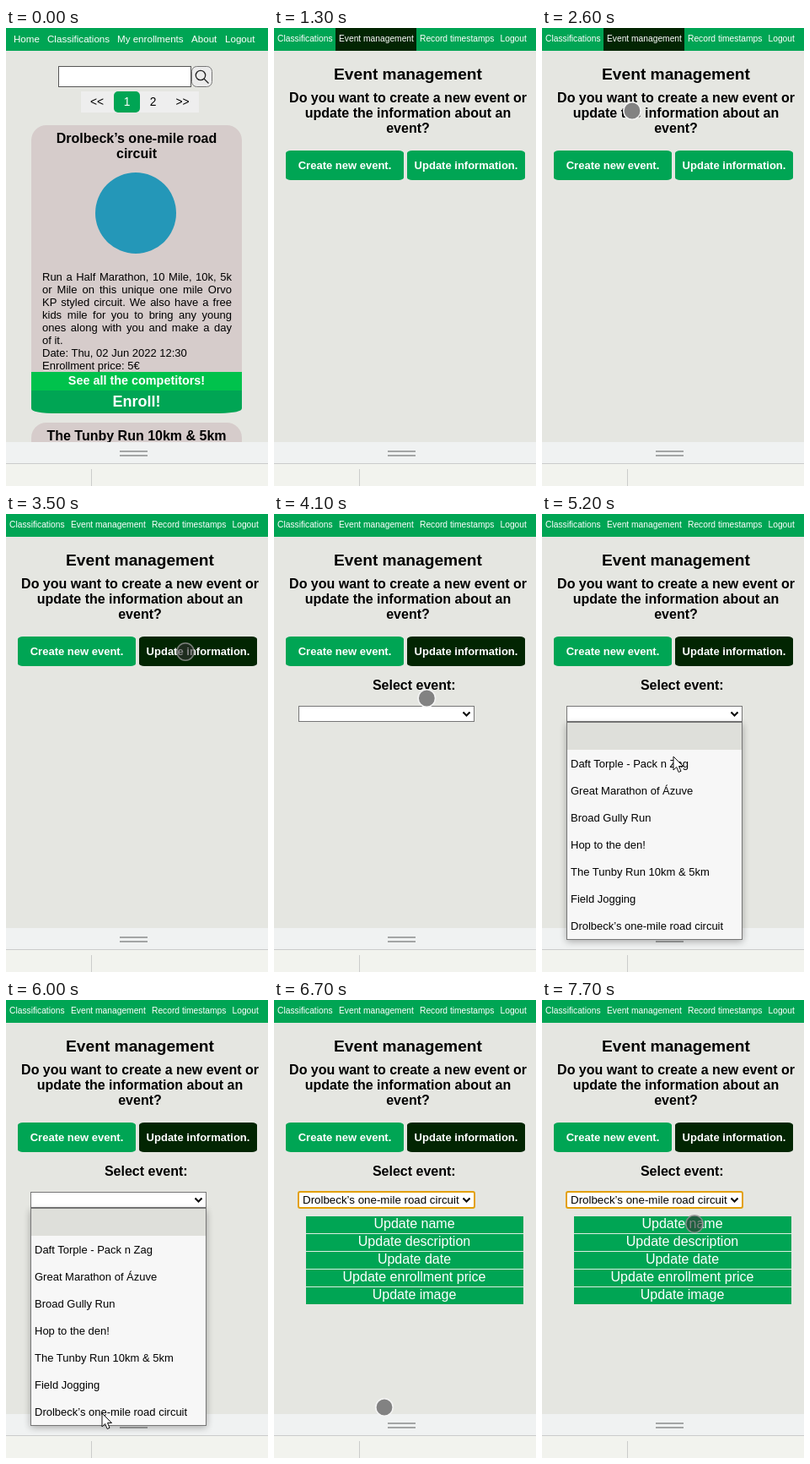
These frames come from a looping animation (311x542 px, 8000 ms). An HTML page:

```html
<!DOCTYPE html>
<html lang="en">
<head>
<meta charset="utf-8">
<title>Event management</title>
<style>
html, body { margin: 0; width: 100%; height: 100%; overflow: hidden; background: #e5e6e1; }
svg { position: absolute; left: 0; top: 0; display: block; }
svg, p { font-family: "Liberation Sans", Arial, sans-serif; }
text { white-space: pre; }
p { margin: 0; font-size: 13px; line-height: 15px; text-align: justify; color: #000; }
.b { font-weight: bold; }
.w { fill: #fff; }
.m { text-anchor: middle; }
.green { fill: #00a554; }
.dark { fill: #022502; }
</style>
</head>
<body>
<svg width="311" height="542" viewBox="0 0 311 542">
  <defs>
    <filter id="blur" x="-20%" y="-20%" width="140%" height="140%"><feGaussianBlur stdDeviation="4"/></filter>
  </defs>
  <rect width="311" height="542" fill="#e5e6e1"/>
  <rect class="green" width="311" height="27"/>

  <g id="home">
    <g id="homeNav" class="w" font-size="11.6"></g>
    <rect x="62.5" y="45.5" width="157" height="24" fill="#fff" stroke="#555"/>
    <rect x="220.5" y="45.5" width="24" height="24" rx="6" fill="#ebebeb" stroke="#777"/>
    <g fill="none" stroke="#222" stroke-width="1.3"><circle cx="231" cy="56" r="5.7"/><path d="M235 60L240.500 65.500"/></g>
    <rect x="89" y="75" width="140" height="25" fill="#eeeeee"/>
    <rect class="green" x="128" y="75" width="31" height="25" rx="5"/>
    <g id="pages" class="m" font-size="13.8"></g>
    <path d="M30 456V133a18 18 0 0 1 18-18H262a18 18 0 0 1 18 18V440H30Z" fill="#d6cccb"/>
    <g class="m b" font-size="16">
      <text x="155" y="136">Drolbeck’s one-mile road</text>
      <text x="155" y="154">circuit</text>
    </g>
    <circle cx="154" cy="219" r="48" fill="#2497b8"/>
    <foreignObject x="43" y="287" width="225" height="122">
      <p>Run a Half Marathon, 10 Mile, 10k, 5k or Mile on this unique one mile Orvo KP styled circuit. We also have a free kids mile for you to bring any young ones along with you and make a day of it.</p>
      <p>Date: Thu, 02 Jun 2022 12:30</p>
      <p>Enrollment price: 5€</p>
    </foreignObject>
    <rect x="30" y="429" width="250" height="28" fill="#e5e6e1"/>
    <rect x="30" y="407" width="250" height="22" fill="#00c24c"/>
    <path class="green" d="M30 429H280V450q0 6-32 6H62q-32 0-32-6Z"/>
    <g class="m b w">
      <text x="155" y="422" font-size="14.4">See all the competitors!</text>
      <text x="155" y="448" font-size="18">Enroll!</text>
    </g>
    <path d="M30 490V485a18 18 0 0 1 18-18H262a18 18 0 0 1 18 18V490Z" fill="#d6cccb"/>
    <text class="m b" x="155" y="488" font-size="16">The Tunby Run 10km &amp; 5km</text>
  </g>

  <g id="manage">
    <rect id="tab" class="dark" x="73" width="96" height="27"/>
    <g id="adminNav" class="w" font-size="10.25"></g>
    <g class="m b" font-size="16">
      <text x="159" y="61" font-size="19.2">Event management</text>
      <text x="159" y="88">Do you want to create a new event or</text>
      <text x="159" y="106">update the information about an</text>
      <text x="159" y="124">event?</text>
    </g>
    <rect class="green" x="14" y="145" width="140" height="35" rx="6" ry="3"/>
    <rect id="update" x="158" y="145" width="140" height="35" rx="6" ry="3"/>
    <g class="m b w" font-size="13">
      <text x="84" y="167">Create new event.</text>
      <text x="228" y="167">Update information.</text>
    </g>
    <g id="select">
      <text class="m b" x="166.300" y="208" font-size="16">Select event:</text>
      <rect x="29.500" y="227.500" width="208" height="18" fill="#fff" stroke="#767676"/>
      <path d="M224.500 234.500l4 4l4-4" fill="none" stroke="#000" stroke-width="2"/>
    </g>
    <g id="chosen">
      <rect x="29" y="227" width="209" height="19" rx="2" fill="none" stroke="#e3a008" stroke-width="2"/>
      <text x="34" y="241" font-size="13.333">Drolbeck’s one-mile road circuit</text>
      <rect x="38" y="256" width="258" height="104" fill="#dceee2"/>
      <g id="updates" class="m w" font-size="16"></g>
    </g>
  </g>

  <rect id="bar" y="490" width="311" height="25"/>
  <path d="M135 501H168M135 506H168" stroke="#a3a5a5" stroke-width="2"/>
  <rect y="515" width="311" height="27" fill="#f2f3ee"/>
  <path d="M0 515.500H311M101.500 522V542" stroke="#cbcccb"/>

  <g id="popup">
    <rect x="29" y="249" width="209" height="257" fill="#000" opacity=".3" filter="url(#blur)"/>
    <rect x="29.500" y="246.500" width="208" height="257" fill="#f7f7f7" stroke="#767676"/>
    <rect x="30" y="247" width="207" height="32" fill="#dedfda"/>
    <g id="options" font-size="13"></g>
  </g>

  <circle id="touch" r="10.200" stroke-width="1.600"/>
  <path id="arrow" d="M0 0V16L3.700 12.500L6.200 18.500L9 17.300L6.500 11.500H11.500Z" fill="#fff" stroke="#111"/>
</svg>
<script>
const $ = id => document.getElementById(id);
const fill = (id, items, make) => { $(id).innerHTML = items.map(make).join(""); };
const label = (x, y, s) => `<text x="${x}" y="${y}">${s}</text>`;

fill("homeNav", [["Home", 9], ["Classifications", 49], ["My enrollments", 132], ["About", 220], ["Logout", 260]],
  ([s, x]) => label(x, 17, s));
fill("adminNav", [["Classifications", 4], ["Event management", 77], ["Record timestamps", 173], ["Logout", 268.5]],
  ([s, x]) => label(x, 16, s));
fill("pages", [["&lt;&lt;", 108], ['<tspan fill="#fff">1</tspan>', 143.5], ["2", 174.5], ["&gt;&gt;", 209.5]],
  ([s, x]) => label(x, 92, s));
fill("options", ["Daft Torple - Pack n Zag", "Great Marathon of Ázuve", "Broad Gully Run", "Hop to the den!",
  "The Tunby Run 10km &amp; 5km", "Field Jogging", "Drolbeck’s one-mile road circuit"],
  (s, i) => label(34, 300 + 32 * i, s));
fill("updates", ["name", "description", "date", "enrollment price", "image"],
  (s, i) => `<rect class="green" x="38" y="${256 + 21 * i}" width="258" height="20"/>` + label(166.5, 270 + 21 * i, "Update " + s));

const LOOP = 8000, STEP = 100;

// Pointer route: time, x, y
const route = [
  [2100, 124, 34], [2300, 157, 64], [2400, 157, 64], [2600, 107, 98], [2900, 239, 160], [3100, 213, 163],
  [3600, 213, 163], [4200, 175, 229], [4700, 175, 229],
  [4800, 184, 246], [4900, 214, 262], [5200, 156, 287], [5300, 156, 287], [5400, 128, 437], [5500, 128, 437],
  [5600, 215, 480], [5700, 160, 496], [5800, 114, 489], [6400, 114, 489],
  [6500, 118, 487], [6700, 131, 482], [6800, 189, 452], [6900, 189, 452], [7000, 231, 435], [7100, 231, 435],
  [7200, 235, 330], [7300, 191, 267], [7400, 191, 267], [7500, 205, 257], [7600, 176, 261], [7700, 181, 265]
];

function pointer(t) {
  const i = route.findIndex(p => p[0] > t);
  if (i < 1) return i ? route[route.length - 1].slice(1) : route[0].slice(1);
  const [t0, x0, y0] = route[i - 1], [t1, x1, y1] = route[i];
  const k = (t - t0) / (t1 - t0);
  return [x0 + (x1 - x0) * k, y0 + (y1 - y0) * k];
}

function draw(now) {
  const t = Math.floor(now % LOOP / STEP) * STEP;
  const within = (a, b) => t >= a && t < b;
  const show = (id, on) => $(id).setAttribute("display", on ? "inline" : "none");

  show("home", t < 1300);
  show("manage", t >= 1300);
  show("tab", within(1300, 3500));
  show("select", t >= 3600);
  show("popup", within(4400, 6100));
  show("chosen", t >= 6100);
  $("update").setAttribute("class", t < 3500 ? "green" : "dark");
  $("bar").setAttribute("fill", within(6100, 6500) ? "#dfe6ee" : "#f0f2f2");

  const pressed = within(3500, 3600) || t >= 7700;
  const touch = $("touch"), at = `translate(${pointer(t)})`;
  show("touch", within(2100, 4800) || t >= 6500);
  show("arrow", within(4800, 6100));
  touch.setAttribute("transform", at);
  touch.setAttribute("fill", pressed ? "rgba(50,50,50,.6)" : "#828282");
  touch.setAttribute("stroke", pressed ? "rgba(150,150,150,.8)" : "#f4f4f4");
  $("arrow").setAttribute("transform", at);
}

const start = performance.now();
function frame() {
  draw(performance.now() - start);
  requestAnimationFrame(frame);
}
frame();
</script>
</body>
</html>
```
